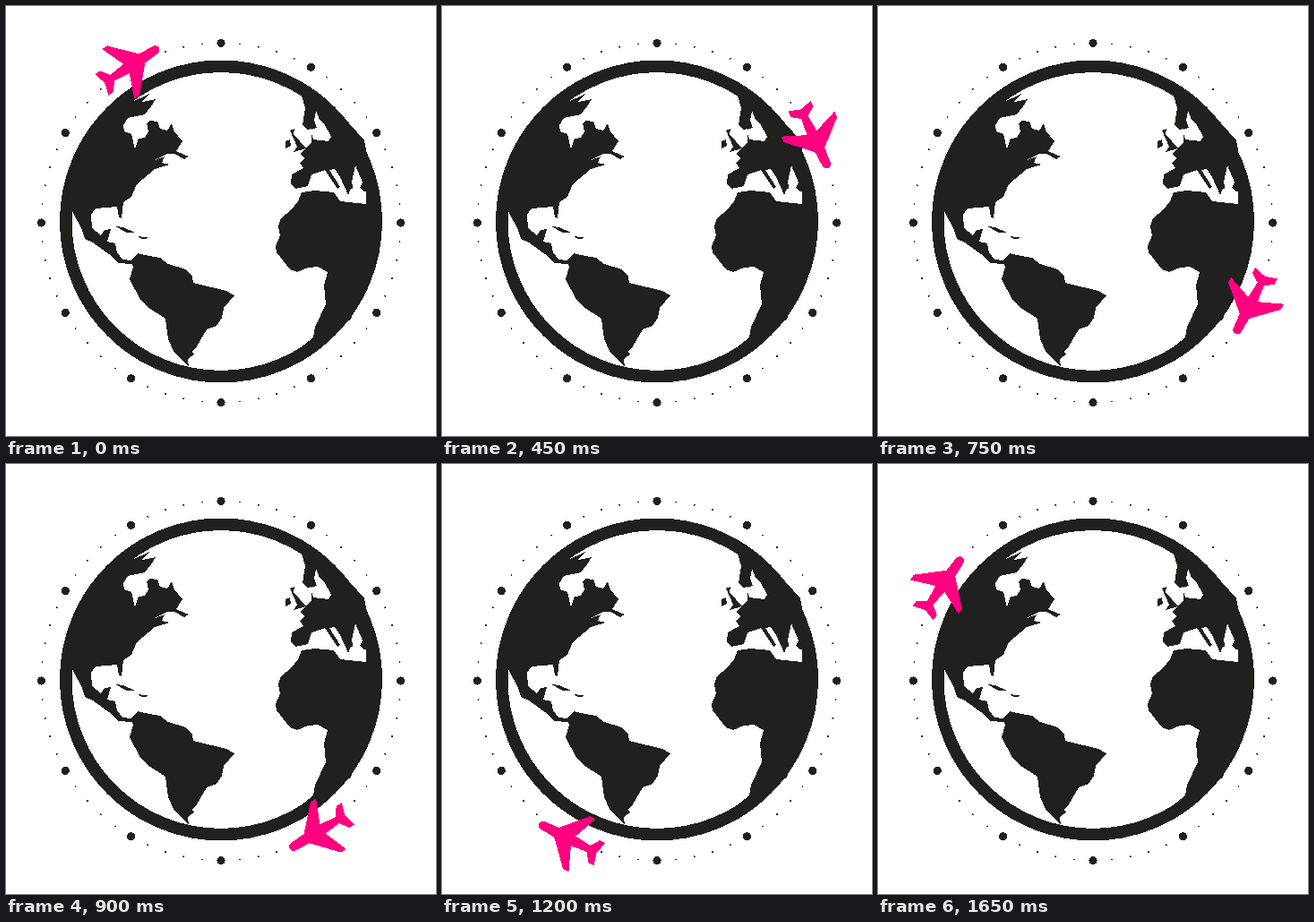
An HTML page that plays this animation: 480 px wide and 480 px high, repeating every 1800 ms.

```html
<!DOCTYPE html>
<html lang="en">
<head>
<meta charset="utf-8">
<title>Plane circling the globe</title>
<style>
  html, body { margin: 0; width: 100%; height: 100%; overflow: hidden; background: #fff; }
  svg { display: block; width: 100vw; height: 100vh; shape-rendering: crispEdges; }
</style>
</head>
<body>
<svg viewBox="0 0 480 480">
  <g fill="#20201e">
    <g id="dots"></g>
    <circle cx="240" cy="240.5" r="173.2" fill="none" stroke="#20201e" stroke-width="13.6"/>

    <!-- North America -->
    <path d="M66 230 70 190 105 122 130 106 137 109 160 98 152 107 167 104 162 112 155 121 136 125 131 133 132 140
      140 143 144 160 148 148 155 147 159 140 157 131 161 128 169 129 172 137 180 139 185 131 188 140 197 151 190 162
      204 168 199 171 188 165 180 165 164 173 177 168 174 175 183 177 166 182 146 199 140 213 131 219 129 237 126 236
      124 224 100 226Z"/>
    <!-- Central America -->
    <path d="M66 230 100 226 95 233 96 248 106 256 110 250 117 249 113 263 122 265 124 275 130 283 140 284 141 288
      125 287 119 280 97 264 88 260 85 250 74 229Z"/>
    <!-- South America -->
    <path d="M139 284 147 276 155 278 172 281 181 288 201 294 208 302 209 309 246 318 255 323 243 337 241 348 235 357
      224 361 213 380 207 386 210 389 203 394 204 403 188 387 181 372 178 349 158 336 150 328 138 305 142 291Z"/>
    <!-- Caribbean -->
    <path d="M122 246 131 247 144 253 135 253ZM147 257 162 259 152 260Z"/>
    <!-- British Isles -->
    <path d="M312 151 317 149 318 156 312 159ZM317 139 322 137 321 143 335 159 321 163 325 157Z"/>
    <!-- Europe and Asia -->
    <path d="M330 100 334 114 331 133 336 138 341 137 341 152 328 165 334 170 328 175 332 181 319 188 318 199 323 204
      337 201 341 188 356 183 370 204 373 202 361 183 367 182 373 191 382 211 385 204 402 207 402 221 416 240 400 150
      375 122Z"/>
    <!-- Africa -->
    <path d="M402 221 373 218 366 208 345 206 330 208 326 218 318 228 307 237 304 246 306 256 301 268 302 275 317 294
      325 297 337 292 348 291 359 297 355 312 357 333 345 358 343 370 328 382 385 350 416 240Z"/>
    <!-- Baltic and Black Sea -->
    <path fill="#fff" d="M346 117 350 127 355 131 363 146 360 151 343 149 340 138 347 136 344 128Z"/>
    <path fill="#fff" d="M390 178 393 185 398 197 395 203 401 208 388 208 386 196Z"/>
  </g>
  <g id="plane" fill="#ff0080">
    <path id="half" d="M0-34Q5-34 5-28L6-12 33 13V20L6 9 4 28 14 35V42L0 38Z"/>
    <use href="#half" transform="scale(-1 1)"/>
  </g>
</svg>
<script>
  const LOOP = 1800;
  // x, y and rotation of the plane at each stop of its orbit
  const stops = [
    [142, 65, 57], [233.5, 44, 90], [347.4, 74, 127], [416.7, 149.8, 155],
    [441.7, 243, 175], [414.5, 335.5, 207], [345.9, 412, 239], [238.5, 441, 270],
    [138.6, 416.7, 297], [62.3, 331.7, 335], [41, 242, -1], [74.4, 132, 35]
  ];
  const plane = document.getElementById("plane");
  const dots = document.getElementById("dots");

  for (let i = 0; i < 60; i++) {
    const angle = i * Math.PI / 30;
    const dot = document.createElementNS("http://www.w3.org/2000/svg", "circle");
    dot.setAttribute("cx", 240 + 200.7 * Math.sin(angle));
    dot.setAttribute("cy", 242 - 200.7 * Math.cos(angle));
    dot.setAttribute("r", i % 5 ? 1 : 4.6);
    dots.append(dot);
  }

  function draw() {
    const step = Math.floor(performance.now() % LOOP / LOOP * stops.length);
    const [x, y, turn] = stops[step];
    plane.setAttribute("transform", `translate(${x} ${y}) rotate(${turn})`);
    requestAnimationFrame(draw);
  }
  draw();
</script>
</body>
</html>
```
